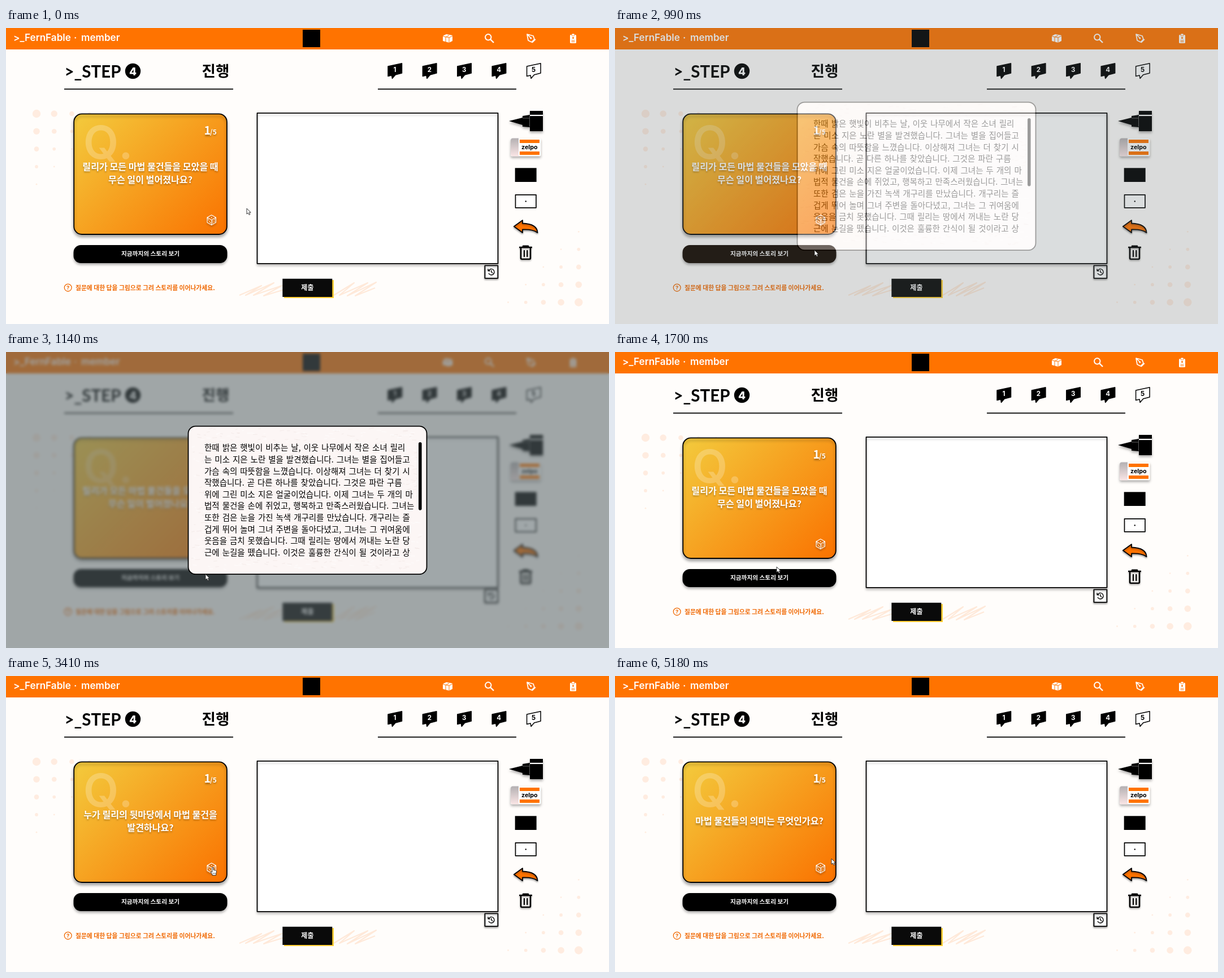
Write an HTML page with a canvas that moves like this. It is 1067 px wide and 525 px high and loops after 5.21 s.

```html
<!DOCTYPE html>
<html lang="ko">
<head>
<meta charset="utf-8">
<style>
html, body { margin: 0; width: 100%; height: 100%; overflow: hidden; background: #fffdfb; }
canvas { display: block; }
</style>
</head>
<body>
<canvas id="stage" width="1067" height="525"></canvas>
<script>
const W = 1067, H = 525, LOOP = 5210;
const ORANGE = '#ff7300', PAPER = '#fffdfb', FAINT = '#ffece0';
const LATIN = 'Inter, "Noto Sans CJK KR", "Noto Sans CJK", sans-serif';
const TITLE = 'Lato, Inter, sans-serif';
const HANGUL = '"Noto Sans CJK KR", "Noto Sans CJK", "Noto Sans KR", sans-serif';
const stage = document.getElementById('stage');
let ctx = stage.getContext('2d');

const QUESTIONS = [
  [0, ['릴리가 모든 마법 물건들을 모았을 때', '무슨 일이 벌어졌나요?']],
  [3020, ['누가 릴리의 뒷마당에서 마법 물건을', '발견하나요?']],
  [4130, ['마법 물건들의 의미는 무엇인가요?']]
];
const STORY = [
  '한때 밝은 햇빛이 비추는 날, 이웃 나무에서 작은 소녀 릴리',
  '는 미소 지은 노란 별을 발견했습니다. 그녀는 별을 집어들고',
  '가슴 속의 따뜻함을 느꼈습니다. 이상해져 그녀는 더 찾기 시',
  '작했습니다. 곧 다른 하나를 찾았습니다. 그것은 파란 구름',
  '위에 그린 미소 지은 얼굴이었습니다. 이제 그녀는 두 개의 마',
  '법적 물건을 손에 쥐었고, 행복하고 만족스러웠습니다. 그녀는',
  '또한 검은 눈을 가진 녹색 개구리를 만났습니다. 개구리는 즐',
  '겁게 뛰어 놀며 그녀 주변을 돌아다녔고, 그녀는 그 귀여움에',
  '웃음을 금치 못했습니다. 그때 릴리는 땅에서 꺼내는 노란 당',
  '근에 눈길을 뗐습니다. 이것은 훌륭한 간식이 될 것이라고 상'
];
// time, x, y of the pointer tip
const POINTER = [
  [0, 426, 320], [540, 372, 378], [600, 364, 387], [690, 358, 389], [880, 353, 394],
  [1340, 353, 394], [1550, 286, 381], [1700, 286, 381], [2180, 366, 339],
  [4950, 366, 339], [5180, 383, 324]
];

const clamp = v => Math.max(0, Math.min(1, v));
const easeOut = v => 1 - (1 - clamp(v)) ** 2;
const smooth = v => v * v * (3 - 2 * v);

function text(str, x, cy, size, { weight = 700, color = '#000', align = 'left', font = HANGUL } = {}) {
  ctx.font = `${weight} ${size}px ${font}`;
  ctx.fillStyle = color;
  ctx.textAlign = align;
  ctx.fillText(str, x, cy + size * .37);
}

function paint(path, fill, stroke, width = 2) {
  if (fill) { ctx.fillStyle = fill; ctx.fill(path); }
  if (stroke) { ctx.strokeStyle = stroke; ctx.lineWidth = width; ctx.stroke(path); }
}
const shape = (d, fill, stroke, width) => paint(new Path2D(d), fill, stroke, width);

function box(x, y, w, h, r, fill, stroke, width) {
  const path = new Path2D();
  path.roundRect(x, y, w, h, r);
  paint(path, fill, stroke, width);
}

function disc(x, y, r, fill, stroke, width) {
  const path = new Path2D();
  path.arc(x, y, r, 0, 7);
  paint(path, fill, stroke, width);
}

function shadowed(draw, blur = 4, dy = 3, color = 'rgba(0,0,0,.32)') {
  ctx.save();
  ctx.shadowColor = color;
  ctx.shadowBlur = blur;
  ctx.shadowOffsetY = dy;
  draw();
  ctx.restore();
}

function at(x, y, draw, angle = 0) {
  ctx.save();
  ctx.translate(x, y);
  ctx.rotate(angle);
  draw();
  ctx.restore();
}

function dots(x, y, dir) {
  for (let row = 0; row < 5; row++)
    for (let col = 0; col + row < 5; col++)
      disc(x + dir * col * 31.2, y + dir * row * 31.3, 7.2 - 1.45 * (col + row), FAINT);
}

function header() {
  ctx.fillStyle = ORANGE;
  ctx.fillRect(0, 0, W, 38);
  const style = { weight: 600, color: '#fff', font: LATIN };
  text('>_FernFable', 13, 17, 17.1, style);
  text('·', 120, 17, 17.1, style);
  text('member', 133, 17, 17.1, style);
  ctx.fillStyle = '#000';
  ctx.fillRect(525, 3, 31, 31);

  shape('M773 14 L779 11 L790 13 V23 L784 26 L773 23Z', '#fff');
  shape('M773 14.5 L778 16 V25 M778 16 L784 13 M784 17 V26 M779 16 L784 17 L790 14', null, ORANGE, 1);
  disc(853.3, 16.3, 5.2, null, '#fff', 2);
  shape('M857 20 L863 26', null, '#fff', 2.4);
  shape('M922 11 L933 14 L935 20 L930 25 L924 22Z M922 11 L928 17 M931 26 L937 20', null, '#fff', 1.7);
  disc(928.8, 18, 1.6, '#fff');
  box(998, 12, 11, 15, 1.5, '#fff');
  box(1001, 10, 5, 4, 1, '#fff', ORANGE, .8);
  disc(1003.5, 17.5, 1.6, ORANGE);
  shape('M1000.5 22 H1006.5 M1000.5 24.5 H1006.5', null, ORANGE, 1.2);
}

function steps() {
  text('>_STEP', 103.5, 77, 29.5, { font: TITLE });
  disc(224.5, 76.5, 13.7, '#000');
  text('4', 224.5, 76.5, 19, { weight: 800, color: '#fff', align: 'center', font: LATIN });
  text('진행', 346.5, 76.5, 26.5);
  ctx.fillStyle = '#000';
  ctx.fillRect(103, 107.5, 299, 1.8);
  ctx.fillRect(658, 107.5, 245, 1.8);
  for (let n = 1; n <= 5; n++) {
    const done = n < 5;
    at(675 + (n - 1) * 61.4, 62, () => {
      shape('M1 6 L25.5 .8 V18 L14 21 L8.5 27.5 L7.5 22 L1 23.5Z', done ? '#000' : '#fff', '#000', 1.5);
      text(n, 13, 12, 11.5, { weight: 700, color: done ? '#fff' : '#000', align: 'center', font: LATIN });
    });
  }
}

function dice(angle) {
  at(363.7, 340.6, () => {
    shape('M0 -8.8 L7.7 -4.5 V4.5 L0 8.8 L-7.7 4.5 V-4.5Z M-7.7 -4.5 L0 0 L7.7 -4.5 M0 0 V8.8', null, '#fff', 1.2);
    for (const [x, y] of [[0, -4.4], [-5.6, -.4], [-2.2, 4.8], [-3.9, 2.2], [2.2, 1.8], [5.6, 3], [2.2, 5], [5.6, -.4]])
      disc(x, y, .9, '#fff');
  }, angle);
}

function card(t) {
  const fill = ctx.createLinearGradient(134.5, 138, 376.5, 380);
  fill.addColorStop(0, '#f3cb3d');
  fill.addColorStop(1, '#fa7200');
  shadowed(() => box(120.2, 152.4, 270.6, 213.6, 14, fill, '#000', 1.8), 5, 4);
  const pale = { weight: 600, color: 'rgba(255,255,255,.23)', align: 'center', font: LATIN };
  text('Q', 168, 202, 81, pale);
  text('.', 212, 202, 81, pale);
  const lines = QUESTIONS.filter(q => q[0] <= t).pop()[1];
  shadowed(() => {
    text('1', 350.5, 182, 20, { color: '#fff' });
    text('/5', 361, 184.5, 12, { color: '#fff' });
    lines.forEach((line, i) =>
      text(line, 255.5, 257.5 + (i - (lines.length - 1) / 2) * 23, 16.1, { color: '#fff', align: 'center' }));
    const hovered = t > 2160 && t < 4980;
    dice(hovered ? .08 * Math.sin((t - 2160) / 500 * Math.PI * 2) : 0);
  }, 3, 2.5, 'rgba(0,0,0,.3)');
}

function storyButton(t) {
  const glow = t => easeOut((t - 585) / 300);
  const h = t < 780 ? glow(t) : glow(780) * (1 - easeOut((t - 780) / 300));
  shadowed(() => box(119.5, 385, 272, 32, 13, `rgb(${255 * h},${115 * h},0)`));
  text('지금까지의 스토리 보기', 255.5, 400.3, 10.7, { color: '#fff', align: 'center' });
}

function footer() {
  const hint = '#f06800';
  disc(109.7, 460.6, 6.4, null, hint, 1.3);
  text('?', 109.7, 460.8, 9.5, { color: hint, align: 'center', font: LATIN });
  text('질문에 대한 답을 그림으로 그려 스토리를 이어나가세요.', 123, 460.8, 10.8, { color: hint });
  shape('M413 474 L452 457 L424 474 L474 452 L438 474 L488 457 L456 475 L492 464', null, '#ffe9d9', 2.2);
  shape('M580 474 L616 452 L590 474 L640 452 L604 475 L655 451 L618 475 L653 461', null, '#ffe9d9', 2.2);
  ctx.fillStyle = '#ffcf33';
  ctx.fillRect(492, 447, 88, 32);
  ctx.fillStyle = '#0a0a0a';
  ctx.fillRect(489.3, 444.7, 88, 32.3);
  text('제출', 533.4, 460.8, 12, { color: '#fff', align: 'center' });
}

function board() {
  shadowed(() => box(444.5, 150.8, 426, 267, 0, '#fff', '#000', 1.8), 4, 3, 'rgba(0,0,0,.22)');
  shadowed(() => box(847.4, 421.4, 23, 22.4, 0, '#fff', '#000', 1.8), 3, 2);
  shape('M854.2 430 A5.3 5.3 0 1 1 854 435 M853 427 V430.8 H856.8 M859 429.5 V433 L861.5 434.8', null, '#000', 1.4);
}

function tools() {
  shadowed(() => {
    shape('M890 165 L914 159 V172Z', '#000');
    shape('M914 156 L927 154 V176 L914 175Z', '#000');
    ctx.fillRect(927, 147, 23, 36);
  });
  shape('M927 155 H950', null, '#fff', 2.2);
  shape('M914 160 H926 M926.5 156 V175', null, '#777', .8);

  shadowed(() => box(893, 195.5, 53.5, 32, 2, '#fff'));
  const rubber = ctx.createLinearGradient(0, 196, 0, 228);
  rubber.addColorStop(0, '#b5b1b3');
  rubber.addColorStop(1, '#fbe6e6');
  box(893, 195.5, 14, 32, [4, 0, 0, 4], rubber);
  ctx.fillStyle = ORANGE;
  ctx.fillRect(909, 198, 35, 6);
  ctx.fillRect(909, 219, 35, 6);
  text('zelpo', 926.3, 211.5, 10.8, { align: 'center', font: LATIN });

  ctx.fillStyle = '#000';
  ctx.fillRect(900.7, 248.3, 38, 24.7);
  box(901.5, 295.8, 36.5, 23, 0, '#fff', '#000', 1.7);
  disc(919.8, 307.4, 1.2, '#000');
  shadowed(() => shape('M898.8 352 L914 341 V346.5 C930 347 940 352 940.5 363 C934 358 926 357 914 357.5 V363Z',
    ORANGE, '#000', 1.8), 3, 2);
  shadowed(() => {
    shape('M908 389 H931 M915 388 V386.8 H924 V388', null, '#000', 2.4);
    shape('M911 390 V408 Q911 410 913 410 H926 Q928 410 928 408 V390', null, '#000', 2.6);
    shape('M917 394 V406 M922.3 394 V406', null, '#000', 2.2);
  }, 3, 2);
}

function page(t) {
  ctx.fillStyle = PAPER;
  ctx.fillRect(0, 0, W, H);
  header();
  steps();
  dots(54, 152, 1);
  dots(1013.3, 486.5, -1);
  card(t);
  storyButton(t);
  footer();
  board();
  tools();
}

// The dimming veil and the story sheet fade together as one layer.
function makeSheet() {
  const layer = document.createElement('canvas');
  layer.width = W;
  layer.height = H;
  const main = ctx;
  ctx = layer.getContext('2d');
  ctx.fillStyle = 'rgba(88,100,104,.57)';
  ctx.fillRect(0, 0, W, H);
  box(322.5, 131.6, 422, 262.6, 13, '#fcf6f5');
  let seed = 7;
  const random = () => (seed = seed * 16807 % 2147483647) / 2147483647;
  for (let i = 0; i < 900; i++) {
    const x = 328 + random() * 404, y = 136 + random() * 250;
    const tint = i % 2 ? 'rgba(255,255,255,.6)' : 'rgba(226,208,205,.24)';
    shape(`M${x} ${y} l${3 + random() * 6} ${random() * 4 - 2}`, null, tint, 1.2);
  }
  box(322.5, 131.6, 422, 262.6, 13, null, '#000', 1.8);
  ctx.wordSpacing = '1.7px';
  STORY.forEach((line, i) => text(line, 351, 170 + i * 20.62, 14.5, { weight: 500 }));
  box(730, 160, 5.6, 120.5, 2.8, '#000');
  ctx = main;
  return layer;
}
const sheet = makeSheet();

function modal(t) {
  if (t < 780 || t >= 1700) return;
  if (t >= 1080) {
    ctx.save();
    ctx.filter = 'blur(2.6px)';
    ctx.drawImage(stage, 0, 0);
    ctx.restore();
  }
  ctx.globalAlpha = clamp((t - 780) / 300) ** 2.7;
  ctx.drawImage(sheet, 0, 0);
  ctx.globalAlpha = 1;
}

function pointer(t) {
  let i = POINTER.findIndex(k => k[0] > t);
  if (i < 0) i = POINTER.length;
  const a = POINTER[i - 1], b = POINTER[i] || a;
  const k = b === a ? 0 : smooth((t - a[0]) / (b[0] - a[0]));
  const hand = t >= 585 && t < 780 || t >= 2120 && t < 5000;
  at(a[1] + (b[1] - a[1]) * k, a[2] + (b[2] - a[2]) * k, () => {
    if (hand) {
      shape('M-1.2 1 Q0 -.4 1.2 1 V5 L5.5 6 Q6.6 6.5 6.5 8 L5.6 12 V14.5 H-1 V13 L-4 8.8 Q-3.6 7.2 -1.2 9Z', '#fff', '#222', .9);
      shape('M2.2 10 V12.5 M4 10 V12.5 M.4 10 V12.5', null, '#222', .6);
    } else {
      shape('M0 0 V10 L2.4 7.9 L4.1 11.4 L5.9 10.6 L4.3 7.2 H7.2Z', '#fff', '#222', .9);
    }
  });
}

function frame(now) {
  const t = now % LOOP;
  ctx.lineJoin = 'round';
  page(t);
  modal(t);
  pointer(t);
  requestAnimationFrame(frame);
}
requestAnimationFrame(frame);
</script>
</body>
</html>
```
